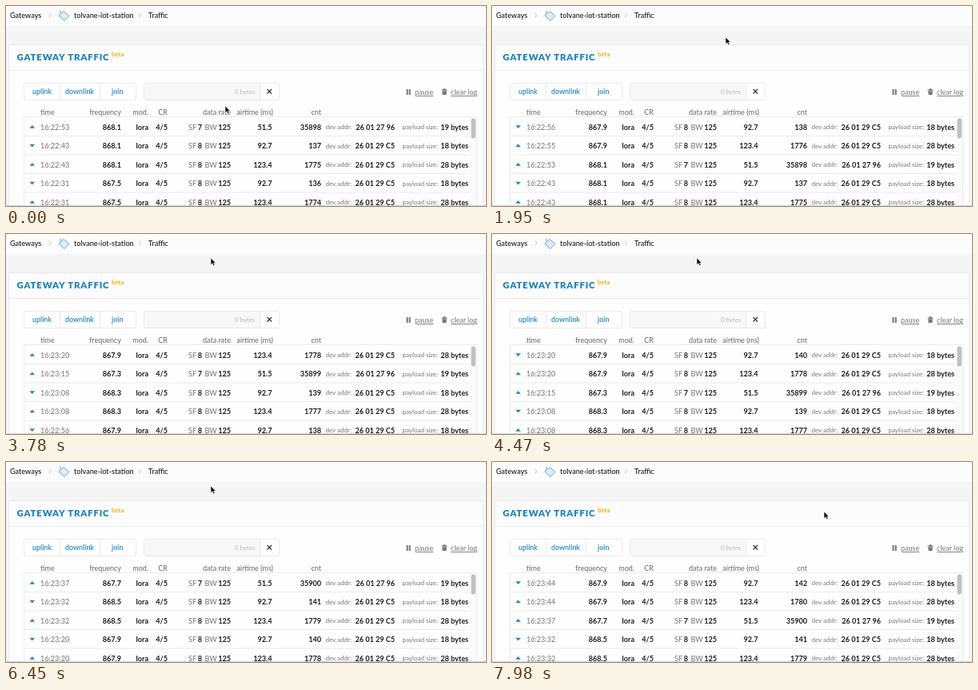
Write an HTML page that moves like this. It is 600 px wide and 250 px high and loops after 8 s.

```html
<!DOCTYPE html>
<html lang="en">
<head>
<meta charset="utf-8">
<title>Gateway traffic</title>
<style>
  html, body { margin: 0; width: 100%; height: 100%; overflow: hidden; background: #fff; }
  svg { display: block; width: 600px; height: 250px; }
  text { font: 500 9.1px Lato, sans-serif; fill: #1c1c1c; }
  .label { font-weight: 400; font-size: 9px; fill: #666; }
  .small { font-weight: 400; font-size: 8px; fill: #777; }
  .value { font-weight: 700; }
  .dim { font-weight: 400; fill: #737373; }
  .link { font-weight: 400; font-size: 9px; fill: #777; text-decoration: underline; }
  .tab { font-weight: 600; font-size: 8.9px; fill: #2088c2; }
  .title { font-weight: 900; font-size: 11.4px; letter-spacing: .83px; fill: #1a82c0; }
  .beta { font-weight: 700; font-size: 7.8px; fill: #efb010; }
  .hint { font-weight: 400; font-size: 7.8px; fill: #b8b8b8; }
  .end { text-anchor: end; }
  .line { fill: none; stroke: #ebebee; }
  .chevron { fill: none; stroke: #c4c4c0; }
  .arrow { fill: #1f86c0; }

  #cursor { animation: roam 8s linear infinite; }
  @keyframes roam {
    0%, 2% { transform: translate(274px, 125px); animation-timing-function: ease-in-out; }
    7%, 37% { transform: translate(292px, 39px); animation-timing-function: ease-in-out; }
    38.4%, 87% { transform: translate(256px, 30px); animation-timing-function: ease-in; }
    90% { transform: translate(290px, -14px); }
    94% { transform: translate(390px, -14px); animation-timing-function: ease-out; }
    97%, 100% { transform: translate(415px, 62px); }
  }
</style>
</head>
<body>
<svg viewBox="0 0 600 250">
  <defs>
    <clipPath id="tableClip"><rect x="22" y="138" width="558" height="112"/></clipPath>
  </defs>

  <rect width="600" height="250" fill="#f5f5f6"/>
  <rect width="600" height="25" fill="#fcfcfc"/>
  <rect x="3" y="48" width="594" height="202" fill="#fefefe"/>
  <rect x="3" y="48" width="594" height="32" fill="#fcfcfc"/>
  <path class="line" d="M3.5 250V48.5H596.5V250M4 80.5H596"/>

  <text x="5" y="15">Gateways</text>
  <path class="chevron" d="M53.5 8.5l3 3-3 3M166 8.5l3 3-3 3"/>
  <g stroke="#5ba3cf" stroke-width=".9" stroke-linejoin="round">
    <path d="M68 10V5.5" fill="none"/>
    <path d="M66 12l6-5.500 7 6-6 6z" fill="#dfeaf3"/>
  </g>
  <text x="85" y="15">tolvane-iot-station</text>
  <text x="178" y="15">Traffic</text>

  <text class="title" x="13.500" y="68">GATEWAY TRAFFIC</text>
  <text class="beta" x="132" y="62.500">beta</text>

  <rect class="line" x="22.500" y="96.500" width="140" height="21" rx="2"/>
  <path class="line" d="M67.500 97v20M117.500 97v20"/>
  <text class="tab" x="33" y="110">uplink</text>
  <text class="tab" x="74" y="110">downlink</text>
  <text class="tab" x="132" y="110">join</text>

  <rect class="line" x="172.500" y="96.500" width="169" height="21" rx="2"/>
  <rect x="173" y="97" width="144" height="20" fill="#f8f8f9"/>
  <path class="line" d="M317.500 97v20"/>
  <text class="hint end" x="311" y="110">0 bytes</text>
  <path d="M326.500 104l5.500 5.500m0-5.500l-5.500 5.500" stroke="#333" stroke-width="1.200"/>

  <path d="M500.500 104h2v7h-2zM503.700 104h2v7h-2z" fill="#777"/>
  <text class="link" x="511" y="111">pause</text>
  <path d="M544.500 104.500h7v1.200h-7zM546.500 103.300h3v1.200h-3zM545.200 106.300h5.600l-.4 4.700h-4.800z" fill="#777"/>
  <text class="link end" x="589" y="111">clear log</text>

  <g id="headings"></g>
  <path class="line" d="M22.500 250V138.500H588.500V250"/>
  <g clip-path="url(#tableClip)"><g id="rows"></g></g>
  <rect x="580" y="139" width="8" height="111" fill="#fafafa"/>
  <rect x="581.500" y="140.500" width="5.500" height="25" rx="2.700" fill="#c0c0c0"/>
  <rect y="249" width="600" height="1" fill="#d4d4d4"/>

  <path id="cursor" d="M0 0V8.500L2 6.700 3.500 9.800 5 9.100 3.600 6.200H6.200Z" fill="#111" stroke="#fff" stroke-width=".5"/>
</svg>

<script>
const LOOP = 8000, ROW_HEIGHT = 23.5, VISIBLE = 5;

// Node types: u = sensor uplink, d = its downlink, s = second sensor.
const kinds = {
  u: { sf: 8, airtime: '123.4', count: 1774, addr: '26 01 29 C5', size: 28 },
  d: { sf: 8, airtime: '92.7', count: 136, addr: '26 01 29 C5', size: 18 },
  s: { sf: 7, airtime: '51.5', count: 35898, addr: '26 01 27 96', size: 19 }
};

// Arrival in ms, clock, frequency, kind; oldest first.
const packets = [
  [0, '22:31', 867.5, 'u'], [0, '22:31', 867.5, 'd'],
  [0, '22:43', 868.1, 'u'], [0, '22:43', 868.1, 'd'],
  [0, '22:53', 868.1, 's'],
  [240, '22:55', 867.9, 'u'], [390, '22:56', 867.9, 'd'],
  [2010, '23:08', 868.3, 'u'], [2160, '23:08', 868.3, 'd'],
  [3120, '23:15', 867.3, 's'],
  [3750, '23:20', 867.9, 'u'], [3900, '23:20', 867.9, 'd'],
  [5550, '23:32', 868.5, 'u'], [5700, '23:32', 868.5, 'd'],
  [6300, '23:37', 867.7, 's'],
  [7350, '23:44', 867.9, 'u'], [7500, '23:44', 867.9, 'd']
];

const text = (x, y, content, style = '') =>
  `<text x="${x}" y="${y}" class="${style}">${content}</text>`;

const rows = document.getElementById('rows');

document.getElementById('headings').innerHTML =
  text(43, 136, 'time', 'label') +
  [[144, 'frequency'], [178, 'mod.'], [202, 'CR'], [281, 'data rate'],
   [334, 'airtime (ms)'], [394, 'cnt']]
    .map(([x, name]) => text(x, 136, name, 'label end')).join('');

function packetRow([, clock, frequency, kind], index) {
  const k = kinds[kind];
  const y = 154.5 - index * ROW_HEIGHT;
  const arrow = kind === 'd'
    ? `M29.5 ${y - 5.2}h6.500l-3.250 3.700z`
    : `M29.5 ${y - 1.8}h6.500l-3.250-3.700z`;
  return `<path class="arrow" d="${arrow}"/>` +
    `<path class="line" d="M23 ${y + 8}H580"/>` +
    text(43, y, '16:' + clock, 'dim') +
    text(144, y, frequency.toFixed(1), 'value end') +
    text(178, y, 'lora', 'value end') +
    text(202, y, '4/5', 'value end') +
    text(228, y, 'SF', 'dim') +
    text(245, y, k.sf, 'value end') +
    text(248.5, y, 'BW', 'dim') +
    text(281, y, 125, 'value end') +
    text(332.5, y, k.airtime, 'value end') +
    text(394, y, k.count++, 'value end') +
    text(399.5, y - .5, 'dev addr:', 'small') +
    text(486, y, k.addr, 'value end') +
    text(495.5, y - .5, 'payload size:', 'small') +
    text(578, y, k.size + ' bytes', 'value end');
}

rows.innerHTML = packets.map((p, i) => `<g>${packetRow(p, i)}</g>`).join('');

const cursorMotion = document.getElementById('cursor').getAnimations()[0];
cursorMotion.pause();

function render() {
  const time = performance.now() % LOOP;
  const newest = packets.filter(([arrival]) => arrival <= time).length - 1;
  rows.setAttribute('transform', `translate(0 ${newest * ROW_HEIGHT})`);
  [...rows.children].forEach((row, i) => {
    const shown = i <= newest && i > newest - VISIBLE;
    row.setAttribute('visibility', shown ? 'visible' : 'hidden');
  });
  cursorMotion.currentTime = time;
  requestAnimationFrame(render);
}
render();
</script>
</body>
</html>
```
